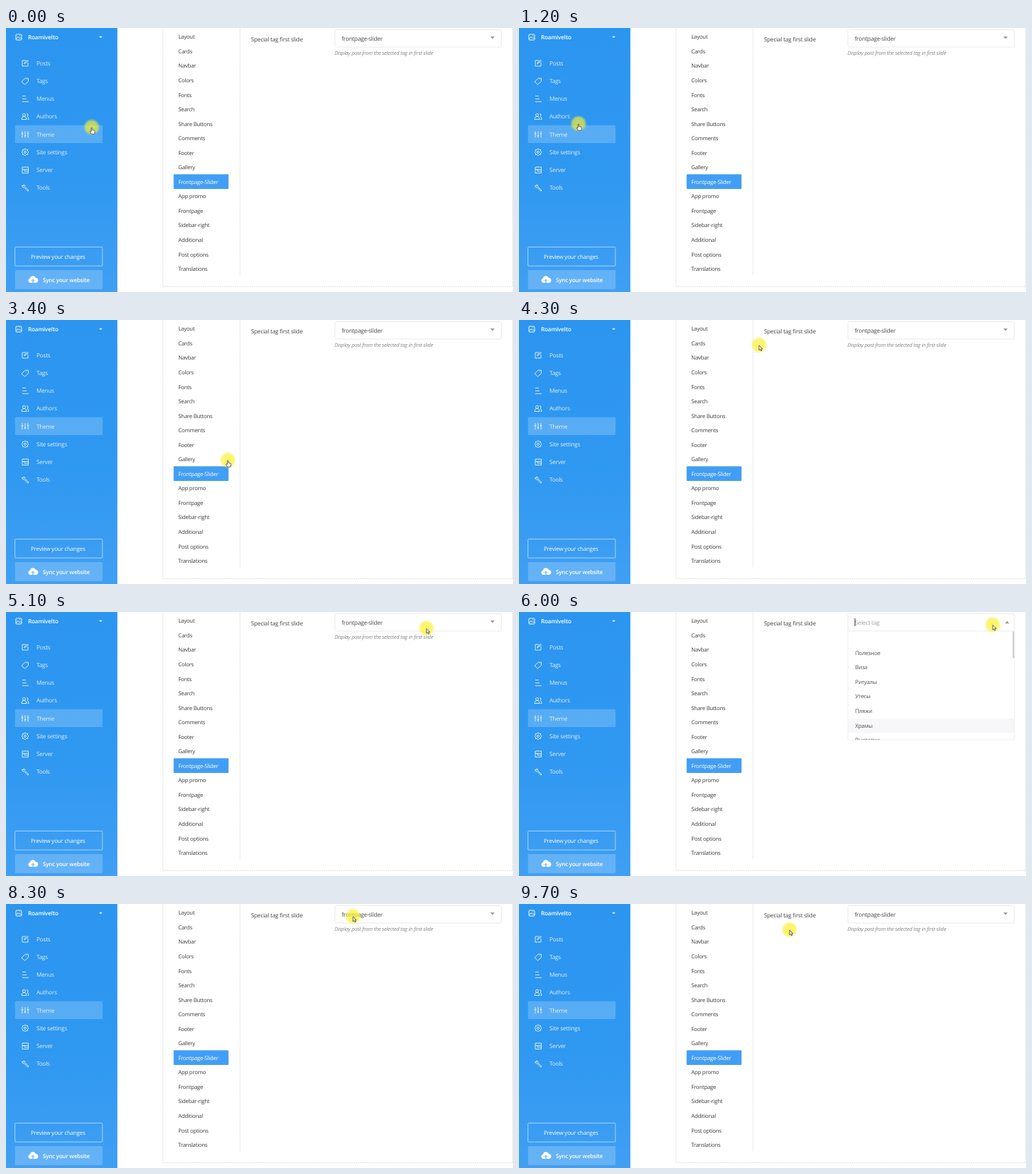
An HTML page that plays this animation: 716 by 374 pixels, repeating every 9800 ms.

```html
<!DOCTYPE html>
<html lang="en">
<head>
<meta charset="utf-8">
<title>Theme settings</title>
<style>
  html, body { margin: 0; width: 100%; height: 100%; overflow: hidden; background: #fff; }
  svg { display: block; width: 716px; height: 374px; }
  text {
    font-family: "Open Sans", "Noto Sans", sans-serif; font-size: 8.2px; letter-spacing: -.2px;
    text-rendering: geometricPrecision; fill: #484848;
  }
  .side text { fill: #fff; fill-opacity: .85; }
  .side .strong { font-weight: 600; fill-opacity: 1; }
  .side .button { font-size: 8px; }
  .icon { fill: none; stroke: #fff; stroke-opacity: .85; stroke-width: .95; stroke-linejoin: round; }
  .sections text { font-size: 7.8px; letter-spacing: -.24px; fill: #3d3d3d; }
  .sections .active { fill: #fff; }
  .options text { font-size: 7.8px; fill: #505050; }
  .rule { fill: none; stroke: #e2e2e2; stroke-dasharray: 2 1; }
  .hint { font-size: 7.4px; font-style: italic; fill: #858585; }
  .placeholder { fill: #a0a0a0; }
</style>
</head>
<body>
<svg viewBox="0 0 716 374">
  <defs>
    <linearGradient id="blue" x2="0" y2="1">
      <stop offset="0" stop-color="#2b95f0"/>
      <stop offset=".55" stop-color="#2f98f1"/>
      <stop offset="1" stop-color="#3f9ff3"/>
    </linearGradient>
    <radialGradient id="glow">
      <stop offset="0" stop-color="#faf02c" stop-opacity=".74"/>
      <stop offset=".68" stop-color="#faf02c" stop-opacity=".66"/>
      <stop offset="1" stop-color="#faf02c" stop-opacity="0"/>
    </radialGradient>
    <clipPath id="listClip"><rect x="464" y="27" width="236" height="154"/></clipPath>
  </defs>
  <rect width="716" height="374" fill="#fff"/>

  <g class="side">
    <rect width="157.3" height="374" fill="url(#blue)"/>
    <g class="icon" style="stroke-opacity:1">
      <rect x="14" y="9" width="8" height="8" rx="1"/>
      <path d="M14.5 15.5l2.5-3 2 2 1-1 2 2M19 11h1"/>
    </g>
    <text class="strong" x="31" y="15.9">Roamivelto</text>
    <path d="M131.5 11.8h4.6l-2.3 2.5z" fill="#fff"/>
    <rect x="12.7" y="137.8" width="123.7" height="25.2" rx="1" fill="#fff" fill-opacity=".2"/>
    <g id="nav"></g>
    <rect x="12.7" y="310.3" width="123.4" height="26.8" rx="1" fill="none" stroke="#fff" stroke-opacity=".55"/>
    <text class="strong button" x="35" y="327.1" style="font-weight:500">Preview your changes</text>
    <rect x="12.7" y="343" width="123.7" height="27" rx="1" fill="#fff" fill-opacity=".2"/>
    <path d="M34 361a3.4 3.4 0 0 1 0-6.6a4.4 4.4 0 0 1 8.2-.5a3.6 3.6 0 0 1 .3 7.1z" fill="#fff"/>
    <path d="M38 361v-4.5M36 358.3l2-2 2 2" fill="none" stroke="#3f9ff3"/>
    <text class="strong button" x="52" y="359.6">Sync your website</text>
  </g>

  <path class="rule" d="M221.5 0V366.5H715.5V0M330.5 0V350"/>
  <rect x="236.7" y="207.3" width="77.6" height="20.8" rx="1" fill="#429ef4"/>
  <g id="sections" class="sections"></g>

  <text x="346" y="18.7">Special tag first slide</text>
  <text class="hint" x="464" y="37.5">Display post from the selected tag in first slide</text>
  <rect x="464.5" y="2.5" width="235" height="24.5" rx="2" fill="#fff" stroke="#ebebeb"/>
  <text id="chosen" x="474" y="17.8">frontpage-slider</text>
  <g id="dropdown">
    <path d="M474.5 9v11" stroke="#444"/>
    <text class="placeholder" x="474.5" y="17.8">Select tag</text>
    <rect x="464.5" y="27" width="235" height="154" fill="#fff" stroke="#f0f0f0"/>
    <g clip-path="url(#listClip)">
      <rect x="465" y="151" width="234" height="20.5" fill="#f7f7f9"/>
      <g id="options" class="options"></g>
      <rect x="697" y="27.5" width="2.5" height="38" fill="#d2d2d2"/>
    </g>
  </g>
  <path id="caret" d="M684 12h6l-3 3.6z" fill="#999"/>

  <g id="pointer">
    <circle cy="-.6" r="12" fill="url(#glow)"/>
    <path id="hand" d="M-.7 .5q.8-.8 1.5 0v3l3 .7q.9.3.7 1.3l-.6 3.7h-4.3l-2.4-3.6q.4-1.2 2.1 0z"
      fill="#fff" stroke="#333" stroke-width=".75" stroke-linejoin="round"/>
    <path id="arrow" d="M0 0v6.8l1.6-1.4 1.1 2.4 1.2-.6-1.1-2.3h2.1z"
      fill="#fff" stroke="#333" stroke-width=".75" stroke-linejoin="round"/>
  </g>
</svg>

<script>
const LOOP = 9800, STEP = 100, OPEN_AT = 5800, CLOSE_AT = 7000, TURN = 200;
const byId = id => document.getElementById(id);

// Icons are drawn around their own centre.
const nav = [
  ["Posts", "M1-4h-5v8h8v-5M-1 1l0-2 4.5-3.5 1 1.2z"],
  ["Tags", "M-5 1L0-4h4.5v4.5L-.5 5zM2-2.2h.8"],
  ["Menus", "M-4-4h5M-4 0h6M-4 4h9"],
  ["Authors", "M-5 4q0-4 3.5-4T2 4zM-3.5-2.2a2 2 0 1 0 4 0a2 2 0 1 0-4 0M2-4q2.5 0 2 2.5L3 0q2 .5 2 4H3.5"],
  ["Theme", "M-4-4.5v9M0-4.5v9M4-4.5v9M-5.3-1h2.6M-1.3 2h2.6M2.7-1h2.6"],
  ["Site settings", "M0-5l1.3 1.4 2.2 0 .1 2.3L5 0 3.6 1.3l-.1 2.2-2.2.1L0 5-1.3 3.6l-2.2-.1-.1-2.2L-5 0l1.4-1.3.1-2.3 2.2 0zM-1.6 0a1.6 1.6 0 1 0 3.2 0a1.6 1.6 0 1 0-3.2 0"],
  ["Server", "M-4-4h8.5v8.5h-8.5zM-4-.6h8.5M-1-.6v2.4h5.5"],
  ["Tools", "M-4.5-2.8l1.8.6.6-2q2.4.4 1.8 2.8L5 3.8 3.9 5-1.2-.2q-2.6.4-3.3-2.6z"]
];
byId("nav").innerHTML = nav.map(([label, shape], i) => {
  const y = 50 + 25.17 * i;
  return `<path class="icon" d="${shape}" transform="translate(27 ${y})"/>` +
    `<text x="43" y="${y + 2.9}">${label}</text>`;
}).join("");

const sections = ["Layout", "Cards", "Navbar", "Colors", "Fonts", "Search", "Share Buttons",
  "Comments", "Footer", "Gallery", "Frontpage-Slider", "App promo", "Frontpage",
  "Sidebar-right", "Additional", "Post options", "Translations"];
byId("sections").innerHTML = sections.map((label, i) =>
  `<text x="243.3" y="${15.4 + 20.54 * i}"${i === 10 ? ' class="active"' : ""}>${label}</text>`).join("");

const options = ["Полезное", "Виза", "Ритуалы", "Утесы", "Пляжи", "Храмы", "Выставки"];
byId("options").innerHTML = options.map((label, i) =>
  `<text x="474.7" y="${60.8 + 20.54 * i}">${label}</text>`).join("");

// Pointer stops: time, x, y
const stops = [
  [0, 121, 141], [1200, 84, 136], [1500, 86, 138], [2400, 309, 206], [2500, 311, 206],
  [3300, 312, 207], [4000, 336, 62], [4300, 339, 36], [4400, 339, 36], [5400, 664, 20],
  [6000, 669, 18.5], [7400, 676, 18], [8300, 490, 18], [9400, 382, 35], [9700, 382, 37]
];
const ease = p => p * p * (3 - 2 * p);
const clamp = p => Math.min(1, Math.max(0, p));

function pointerAt(t) {
  const next = stops.findIndex(s => s[0] >= t);
  if (next <= 0) return stops[next < 0 ? stops.length - 1 : 0].slice(1);
  const [t0, x0, y0] = stops[next - 1], [t1, x1, y1] = stops[next];
  const p = ease((t - t0) / (t1 - t0));
  return [x0 + (x1 - x0) * p, y0 + (y1 - y0) * p];
}

const show = (id, on) => byId(id).setAttribute("visibility", on ? "visible" : "hidden");

function render(t) {
  const [x, y] = pointerAt(t);
  const overLink = x < 137 || (x > 237 && x < 315);
  byId("pointer").setAttribute("transform", `translate(${x} ${y})`);
  show("hand", overLink);
  show("arrow", !overLink);

  const open = t >= OPEN_AT && t < CLOSE_AT;
  show("dropdown", open);
  show("chosen", !open);
  const turn = ease(clamp((t - OPEN_AT) / TURN)) - ease(clamp((t - CLOSE_AT) / TURN));
  byId("caret").setAttribute("transform", `rotate(${180 * turn} 688.2 14.1)`);
}

function tick() {
  const t = performance.now() % LOOP;
  render(Math.floor(t / STEP) * STEP);
  requestAnimationFrame(tick);
}
tick();
</script>
</body>
</html>
```
